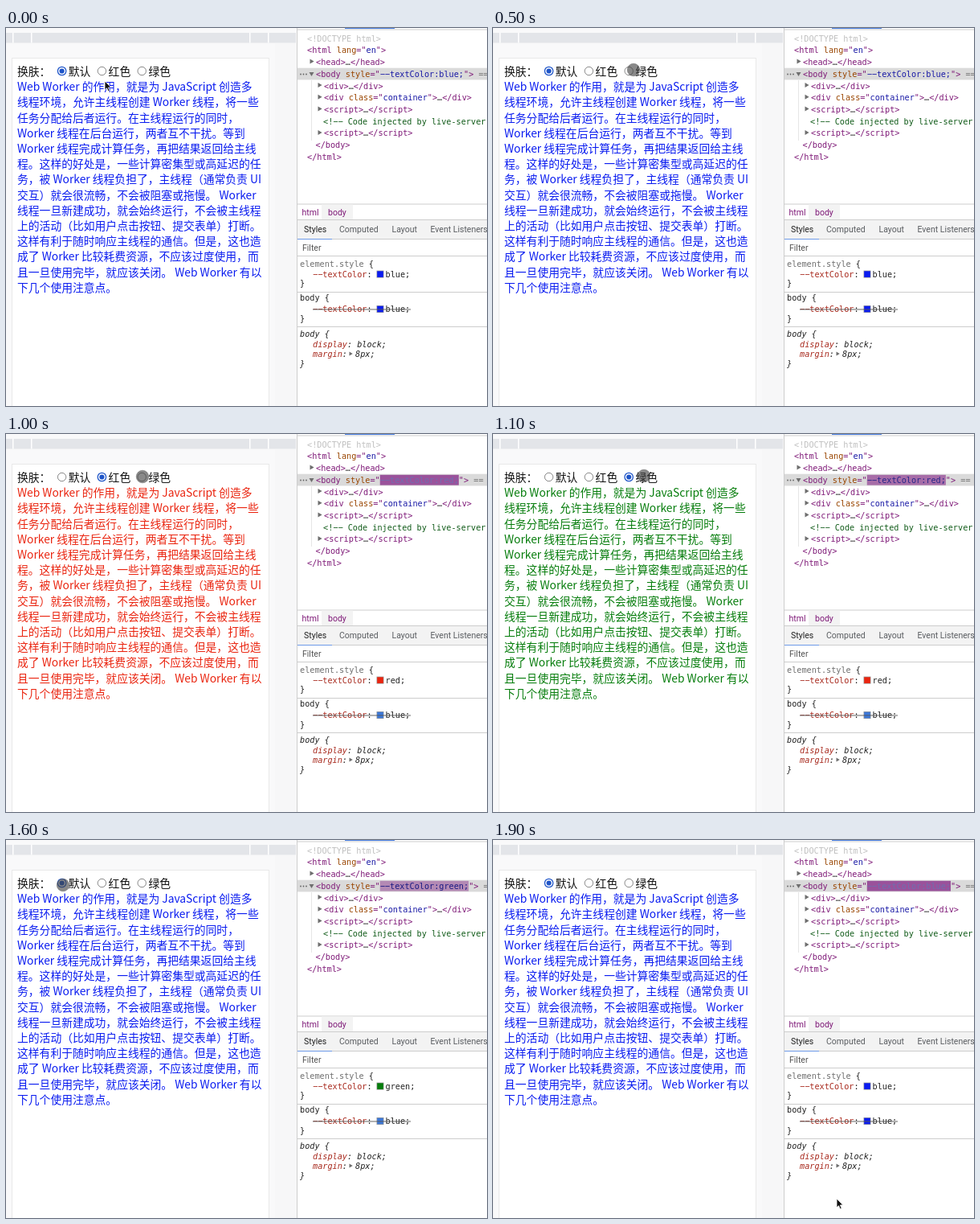
Write an HTML page with a canvas that moves like this. It is 599 px wide and 470 px high and loops after 2000 ms.

```html
<!DOCTYPE html>
<html lang="zh">
<head>
<meta charset="utf-8">
<style>
  html, body { margin: 0; width: 100%; height: 100%; overflow: hidden; background: #fff; }
  canvas { display: block; width: 599px; height: 470px; }
</style>
</head>
<body>
<canvas id="stage"></canvas>
<script>
const canvas = document.getElementById('stage');
const ctx = canvas.getContext('2d');
const ratio = window.devicePixelRatio || 1;
canvas.width = 599 * ratio;
canvas.height = 470 * ratio;
ctx.scale(ratio, ratio);

const LOOP = 2000, STEP = 100;
const PAGE = '13.8px "Noto Sans CJK SC", "Noto Sans CJK", sans-serif';
const MONO = '10.2px "DejaVu Sans Mono", monospace';
const UI = '10.5px Roboto, sans-serif';
const TAG = '#7f1a78', ATTR = '#994500', VALUE = '#1a1aa6';
const PROP = '#a82a1e', INK = '#222', RULE = '#cdcdcd', ROW = '#dadada';
const SKINS = { blue: '#0a1cf0', red: '#ea2510', green: '#067d0c' };

const LINES = [
  'Web Worker 的作用，就是为 JavaScript 创造多',
  '线程环境，允许主线程创建 Worker 线程，将一些',
  '任务分配给后者运行。在主线程运行的同时，',
  'Worker 线程在后台运行，两者互不干扰。等到',
  'Worker 线程完成计算任务，再把结果返回给主线',
  '程。这样的好处是，一些计算密集型或高延迟的任',
  '务，被 Worker 线程负担了，主线程（通常负责 UI',
  '交互）就会很流畅，不会被阻塞或拖慢。 Worker',
  '线程一旦新建成功，就会始终运行，不会被主线程',
  '上的活动（比如用户点击按钮、提交表单）打断。',
  '这样有利于随时响应主线程的通信。但是，这也造',
  '成了 Worker 比较耗费资源，不应该过度使用，而',
  '且一旦使用完毕，就应该关闭。 Web Worker 有以',
  '下几个使用注意点。'
];

// [time, x, y] of the pointer
const PATH = [
  [0, 123, 66], [300, 150, 58], [500, 175, 52], [700, 121, 53], [800, 166, 53], [1000, 170, 53],
  [1100, 188, 52], [1400, 77, 72], [1600, 71, 56], [1700, 84, 60], [1900, 428, 446], [2000, 428, 446]
];

const skinAt = t => t < 700 || t >= 1600 ? 'blue' : t < 1100 ? 'red' : 'green';

function mix(from, to, k) {
  return `rgb(${from.map((v, i) => Math.round(v + (to[i] - v) * k))})`;
}

function rect(x, y, w, h, color) {
  ctx.fillStyle = color;
  ctx.fillRect(x, y, w, h);
}

function text(str, x, y, color, font) {
  // The inspector's font has long dashes
  const glyphs = str.replace(/--/g, '\u2212\u2212');
  ctx.font = font;
  ctx.fillStyle = color;
  ctx.fillText(glyphs, x, y);
  return x + ctx.measureText(glyphs).width;
}

function disc(x, y, r, fill, stroke, width = 1) {
  ctx.beginPath();
  ctx.arc(x, y, r, 0, Math.PI * 2);
  if (fill) { ctx.fillStyle = fill; ctx.fill(); }
  if (stroke) { ctx.strokeStyle = stroke; ctx.lineWidth = width; ctx.stroke(); }
}

function polygon(points, fill, stroke) {
  ctx.beginPath();
  points.forEach(([x, y]) => ctx.lineTo(x, y));
  ctx.closePath();
  ctx.fillStyle = fill;
  ctx.fill();
  if (stroke) { ctx.strokeStyle = stroke; ctx.lineWidth = 0.8; ctx.stroke(); }
}

const arrowRight = (x, y, h = 3) =>
  polygon([[x, y - h], [x + h * 1.7, y], [x, y + h]], '#6e6e6e');

// Draws [text, color] pairs one after another
function runs(x, y, parts, font = MONO) {
  return parts.reduce((end, [str, color]) => text(str, end, y, color, font), x);
}

function openTag(name, attr, value) {
  return attr
    ? [['<' + name + ' ', TAG], [attr, ATTR], ['="', TAG], [value, VALUE], ['">', TAG]]
    : [['<' + name + '>', TAG]];
}

const folded = (name, attr, value) =>
  [...openTag(name, attr, value), ['…', '#333'], ['</' + name + '>', TAG]];

function drawPage(skin) {
  rect(0, 0, 362, 470, '#f9f9fa');
  rect(335, 19, 27, 451, '#f7f7f8');
  rect(0, 6, 361, 12.5, '#e3e5e9');
  for (const x of [8, 31, 303, 326]) rect(x, 6, 1.5, 12.5, '#fff');
  rect(7, 37, 321, 433, '#e9e9e9');
  rect(8, 38, 319, 432, '#fff');

  text('换肤：', 14, 58.7, '#111', PAGE);
  [['blue', '默认'], ['red', '红色'], ['green', '绿色']].forEach(([name, label], i) => {
    const x = 69.6 + i * 49.8, on = name === skin;
    disc(x, 53.5, 5.2, '#fff', on ? '#1f55c8' : '#777', on ? 1.3 : 0.9);
    if (on) disc(x, 53.5, 3.1, '#1f55c8');
    text(label, x + 8.2, 58.7, '#111', PAGE);
  });

  LINES.forEach((line, i) => text(line, 14, 78.1 + i * 19.2, SKINS[skin], PAGE));
}

function drawElements(skin, fade) {
  const y = i => 16.7 + i * 14.7;
  rect(363, 1.5, 236, 1, RULE);
  rect(422, 0, 62, 1, '#4a7fe0');
  rect(363, 49.7, 236, 14.7, ROW);
  rect(380, 65, 1, 75, '#e6e6e6');

  text('<!DOCTYPE html>', 375, y(0), '#c0c0c0', MONO);
  runs(375, y(1), openTag('html', 'lang', 'en'));
  arrowRight(378.5, 41.5);
  runs(386, y(2), folded('head'));

  for (let i = 0; i < 3; i++) disc(367 + i * 3.5, 57.5, 0.9, '#666');
  polygon([[377.5, 55], [383.5, 55], [380.5, 60]], '#6e6e6e');
  const value = `--textColor:${skin};`;
  const x = runs(386, y(3), [['<body ', TAG], ['style', ATTR], ['="', TAG]]);
  let color = VALUE;
  if (fade < 1) {
    ctx.font = MONO;
    rect(x, 50.8, ctx.measureText(value).width, 12.8, mix([128, 28, 130], [218, 218, 218], fade));
    color = mix([255, 255, 255], [26, 26, 130], Math.min(1, fade * 2.2));
  }
  runs(x, y(3), [[value, color], ['">', TAG], [' == $0', '#777']]);

  const children = [folded('div'), folded('div', 'class', 'container'), folded('script'), null, folded('script')];
  children.forEach((parts, i) => {
    const row = i + 4;
    if (!parts) return text('<!-- Code injected by live-server -->', 395, y(row), '#125c1a', MONO);
    arrowRight(388.5, y(row) - 4.4);
    runs(396, y(row), parts);
  });
  text('</body>', 385.5, y(9), TAG, MONO);
  text('</html>', 375, y(10), TAG, MONO);
}

function drawTabs() {
  rect(363, 218.5, 236, 1, RULE);
  rect(393, 219.5, 39, 18.5, '#f3f3f3');
  text('html', 368.5, 232.5, TAG, UI);
  text('body', 401, 232.5, TAG, UI);
  rect(363, 238, 236, 24.5, '#f3f3f3');
  rect(363, 238, 236, 1, RULE);
  rect(363, 262, 236, 1, RULE);
  rect(363, 262, 43, 1, '#6f9be8');
  [['Styles', 371], ['Computed', 415], ['Layout', 480.5], ['Event Listeners', 528.5]]
    .forEach(([label, x], i) => text(label, x, 254.3, i ? '#5a5d61' : '#222', UI));
  text('Filter', 369, 276.8, '#555', UI);
  rect(363, 283, 236, 1, RULE);
}

function drawVariable(y, name, swatch) {
  runs(382, y, [['--textColor', PROP], [':', INK]]);
  rect(461.5, y - 8.2, 9, 9, '#999');
  rect(462.2, y - 7.5, 7.6, 7.6, swatch);
  text(name + ';', 472.5, y, INK, MONO);
}

function drawStyles(skin) {
  runs(366, 296.6, [['element.style', '#6e6e6e'], [' {', INK]]);
  drawVariable(309.8, skin, SKINS[skin]);
  text('}', 366, 321.4, INK, MONO);
  rect(363, 328, 236, 1, RULE);

  text('body {', 366, 339.4, INK, MONO);
  drawVariable(353.2, 'blue', skin === 'blue' ? SKINS.blue : '#3c78d8');
  rect(382, 349.5, 122, 0.9, '#555');
  text('}', 366, 365.4, INK, MONO);
  rect(363, 371, 236, 1, RULE);

  const italic = 'italic ' + MONO;
  text('body {', 366, 383.6, INK, italic);
  runs(382, 396.6, [['display', PROP], [': block;', INK]], italic);
  runs(382, 408.6, [['margin', PROP], [':', INK]], italic);
  arrowRight(427.5, 405, 2.5);
  text('8px;', 435, 408.6, INK, italic);
  text('}', 366, 420.6, INK, italic);
}

function drawPointer(t) {
  const i = PATH.findIndex(p => p[0] > t) - 1;
  const [t0, x0, y0] = PATH[i], [t1, x1, y1] = PATH[i + 1];
  const k = (t - t0) / (t1 - t0);
  const x = x0 + (x1 - x0) * k, y = y0 + (y1 - y0) * k;
  if (t < 100 || x > 334) {
    const shape = [[0, 0], [0, 11], [2.5, 8.7], [4.3, 12.8], [6.2, 12], [4.4, 8], [7.8, 7.8]];
    polygon(shape.map(([dx, dy]) => [x + dx, y + dy]), '#111', '#fff');
  } else {
    disc(x, y, 7.8, 'rgba(65,65,65,.62)', 'rgba(90,90,90,.4)');
  }
}

function draw(now) {
  const t = Math.floor(now % LOOP / STEP) * STEP;
  // The inspector follows the page one step later
  const inspected = skinAt(t - STEP);
  const changedAt = [1700, 1200, 800].find(at => t >= at);
  const fade = changedAt ? Math.min(1, (t - changedAt) / 700) : 1;

  rect(0, 0, 599, 470, '#fff');
  drawPage(skinAt(t));
  rect(362, 0, 1, 470, RULE);
  drawElements(inspected, fade);
  drawTabs();
  drawStyles(inspected);
  drawPointer(t);
}

const start = performance.now();
function tick() {
  draw(performance.now() - start);
  requestAnimationFrame(tick);
}
tick();
</script>
</body>
</html>
```
